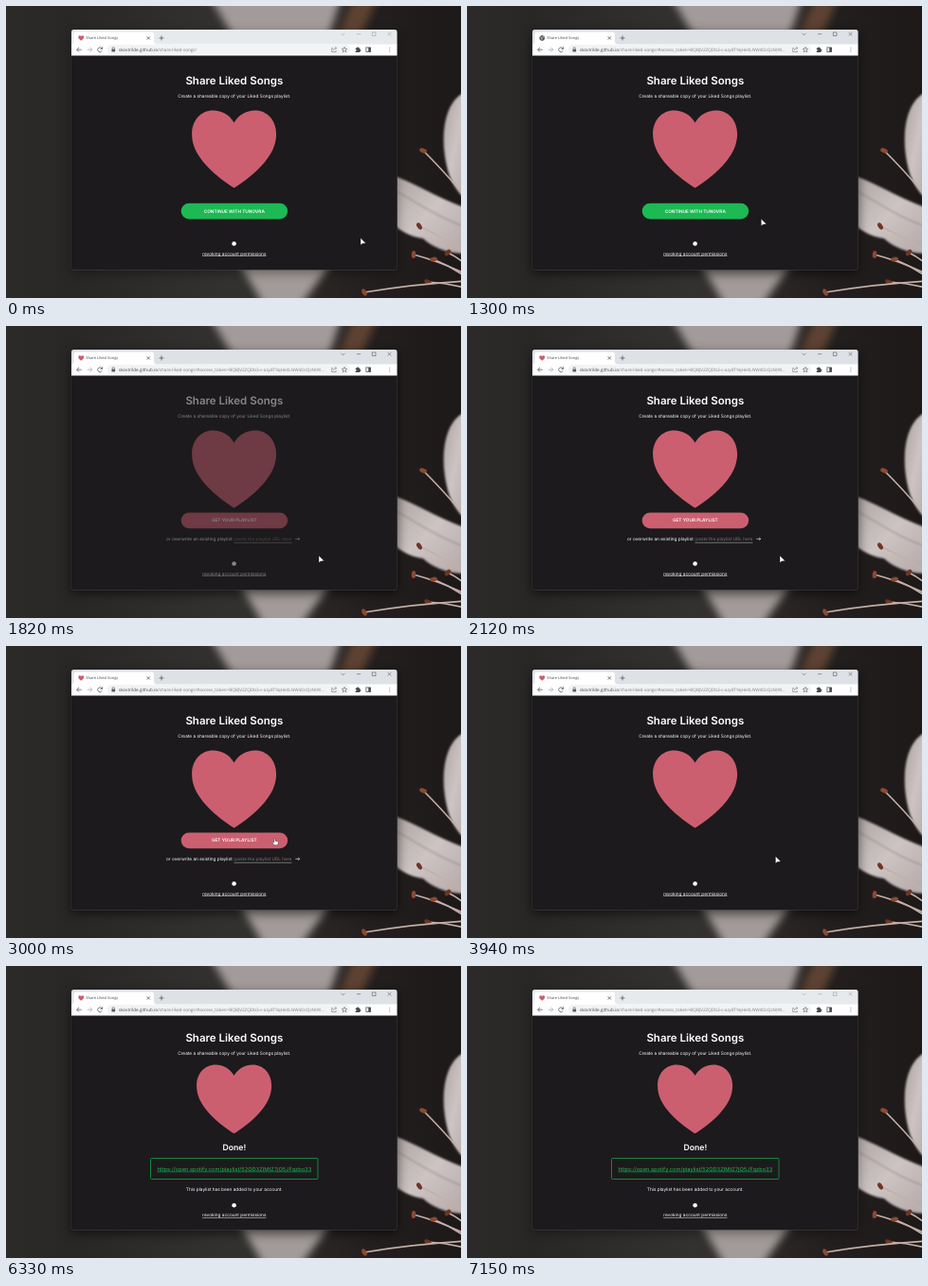
These frames come from a looping animation (480x309 px, 7.18 s). An HTML page:

```html
<!DOCTYPE html>
<html lang="en">
<head>
<meta charset="utf-8">
<title>Share Liked Songs</title>
<style>
  html, body { margin: 0; width: 100%; height: 100%; overflow: hidden; background: #222120; }
  svg { display: block; width: 100%; height: 100%; }
  text { text-rendering: geometricPrecision; }
  .page text { font-family: Inter, "Open Sans", sans-serif; font-size: 4.75px; fill: #fff; text-anchor: middle; }
  .page .title { font-size: 11.5px; font-weight: 600; }
  .page .label { font-size: 4.75px; font-weight: 600; }
  .page .done { font-size: 8.7px; font-weight: 600; }
  .page .link { font-size: 5.7px; fill: #1db954; }
  .page .left { text-anchor: start; }
  .underline { text-decoration: underline; }
  .chrome text { font-family: "Open Sans", "Noto Sans", sans-serif; fill: #45494d; }
  .chrome .path { fill: #7b8085; }
  .line { fill: none; stroke: #54585c; stroke-width: .8; }
</style>
</head>
<body>
<svg viewBox="0 0 480 309" xmlns="http://www.w3.org/2000/svg">
  <defs>
    <linearGradient id="night">
      <stop offset="0" stop-color="#2c2b29"/><stop offset=".14" stop-color="#282725"/>
      <stop offset=".5" stop-color="#343230"/><stop offset=".8" stop-color="#231f1e"/>
      <stop offset="1" stop-color="#1d1919"/>
    </linearGradient>
    <linearGradient id="petal" x1="0" y1="0" x2="1" y2="1">
      <stop offset="0" stop-color="#aaa19f"/><stop offset=".5" stop-color="#cdc4c3"/>
      <stop offset="1" stop-color="#b3a8a7"/>
    </linearGradient>
    <filter id="soft" x="-30%" y="-50%" width="160%" height="200%"><feGaussianBlur stdDeviation="4"/></filter>
    <filter id="haze" x="-30%" y="-30%" width="160%" height="160%"><feGaussianBlur stdDeviation="1"/></filter>
    <filter id="shade" x="-20%" y="-20%" width="140%" height="140%"><feGaussianBlur stdDeviation="6"/></filter>
    <clipPath id="frame"><rect x="69" y="25" width="343.5" height="254" rx="2.5"/></clipPath>
    <path id="heart" fill="#cb5f70" d="M0 82.5C-7 78-19 70-29 59C-39 48-44.5 37.500-44.5 25.5C-44.5 11-35 .5-22 .5C-13 .5-4.5 5.500 0 13.5C4.5 5.500 13 .5 22 .5C35 .5 44.5 11 44.5 25.5C44.5 37.500 39 48 29 59C19 70 7 78 0 82.5Z"/>
  </defs>

  <g id="photo">
    <rect width="480" height="309" fill="url(#night)"/>
    <g filter="url(#soft)">
      <path fill="#a29b99" d="M212 -15H356L338 40H244Z"/>
      <path fill="#5d4232" d="M368 -12H394L370 40H346Z"/>
      <path fill="#a29b99" d="M240 262H350L306 324H276Z"/>
    </g>
    <g filter="url(#haze)">
      <path fill="url(#petal)" d="M486 90C468 98 460 120 462 150C464 174 470 192 486 206Z"/>
      <path fill="url(#petal)" d="M404 178C430 186 456 204 486 214V262C466 262 451 256 440 246C425 244 412 236 404 226Z"/>
      <path fill="none" stroke="#8d807e" stroke-width="1" d="M480 232C458 224 436 210 412 196"/>
    </g>
    <g id="stamens" fill="none" stroke="#c4b0a8" stroke-width="1.6"></g>
  </g>

  <rect id="shadow" x="69" y="29" width="343.5" height="254" rx="3" filter="url(#shade)"/>
  <rect x="68.700" y="25" width="344.100" height="254.400" rx="2.8" fill="#4a4745"/>
  <g clip-path="url(#frame)">
    <rect x="69" y="52" width="344" height="228" fill="#1c1a1c"/>
    <g class="page" id="pages"></g>
    <g class="chrome">
      <rect id="strip" x="69" y="25" width="344" height="16"/>
      <path fill="#fff" d="M69 40.5C71 40.5 71.5 39 71.5 37V30Q71.5 27.5 74 27.5H153.5Q156 27.5 156 30V37C156 39 157 40.5 159 40.5H413V52.5H69Z"/>
      <use id="loved" href="#heart" transform="translate(79.2 31.2) scale(.066)"/>
      <g id="globe" class="line"><circle cx="79.2" cy="33.9" r="2.5" fill="#5f6368"/><path stroke="#fff" stroke-width=".6" d="M77.5 33L79 34L78.8 35.6M79.7 32L81 33.5"/></g>
      <text x="84.2" y="35.4" font-size="4.05">Share Liked Songs</text>
      <path class="line" d="M148.7 32.3L151.9 35.5M151.9 32.3L148.7 35.5M161.5 33.9H166.5M164 31.4V36.4"/>
      <path id="controls" fill="none" stroke-width=".55" d="M353.5 28.8L355.5 30.8L357.5 28.8M370 29.7H374.3M386.3 27.9H390V31.5H386.3ZM402.700 27.900L406.300 31.5M406.300 27.900L402.700 31.5"/>
      <rect x="106.5" y="41" width="256.5" height="10.2" rx="5.1" fill="#f1f3f4"/>
      <g class="line">
        <path d="M79.8 46.2H74.8M77 43.8L74.6 46.2L77 48.6"/>
        <path stroke="#a9adb1" d="M85.7 46.2H90.7M88.5 43.8L90.9 46.2L88.5 48.6"/>
        <path d="M101.2 45A2.4 2.4 0 1 0 101.3 47.3M101.6 43.3V45.4H99.5"/>
        <path stroke-width=".6" d="M112.2 45.7V44.7A1.1 1.1 0 0 1 114.4 44.7V45.7"/>
        <rect x="111.5" y="45.6" width="3.6" height="2.8" fill="#54585c" stroke="none"/>
        <path stroke-width=".5" d="M345 44.5H343.7V48.6H348.2V47M345.5 47C345.6 45.2 346.5 44.6 348.5 44.6M347.3 43.3L348.7 44.6L347.3 45.9"/>
        <path stroke-width=".6" d="M357 43.5L357.8 45.2L359.7 45.4L358.3 46.7L358.7 48.6L357 47.6L355.3 48.6L355.7 46.7L354.3 45.4L356.2 45.2Z"/>
        <path fill="#44484c" stroke="none" d="M368.7 44.5H370A1.1 1.1 0 0 1 372.2 44.5H373.3V45.8A1.1 1.1 0 0 1 373.3 48V49H368.7V47.7A1 1 0 0 0 368.7 45.7Z"/>
        <rect x="379.9" y="43.9" width="4.6" height="4.6"/><path fill="#44484c" stroke="none" d="M382.3 43.9H384.7V48.5H382.3Z"/>
        <path stroke-linecap="round" d="M404.8 44.2V44.21M404.8 46.2V46.21M404.8 48.2V48.21"/>
      </g>
      <text x="118.8" y="47.9" font-size="4.65">skovtrilde.github.io<tspan class="path" id="path"></tspan></text>
    </g>
  </g>

  <g id="cursor" stroke="#111" stroke-width=".4" fill="#fff">
    <path id="arrow" d="M0 0V7.6L1.9 6L5.6 5.6Z"/>
    <path id="hand" d="M-.7 .6Q0 -.3 .6 .6V2.7L3.3 3.3Q3.9 3.5 3.8 4.3L3.2 7.3H-.4L-2.6 4.6Q-2.5 3.5 -1.5 4L-.7 4.7Z"/>
  </g>
</svg>

<script>
const LOOP = 7180;
const CLICK = 880, REDIRECT = 1150, BLANK = 1520, FADE_IN = 1580;
const SUBMIT = 3180, DONE = 4420, EXIT = 5490, BLUR = 6330;
const CENTER = 240.8;
const $ = id => document.getElementById(id);
const clamp = v => Math.max(0, Math.min(1, v));
const swing = v => .5 - Math.cos(Math.PI * clamp(v)) / 2;
const mix = (a, b, k) => a + (b - a) * k;
const show = (id, on) => $(id).setAttribute('visibility', on ? 'visible' : 'hidden');
const fade = (id, value) => $(id).setAttribute('opacity', value);

const label = (y, str, cls = '', x = CENTER) => `<text class="${cls}" x="${x}" y="${y}">${str}</text>`;
const pill = (y, fill, str) =>
  `<rect x="184.7" y="${y}" width="112.5" height="16.7" rx="8.35" fill="${fill}"/>` + label(y + 9.9, str, 'label');

function page(id, { top = 0, heartY = 110, scale = 1, foot = 0 }, body) {
  return `<g id="${id}">
    ${label(83.4 + top, 'Share Liked Songs', 'title')}
    ${label(96.6 + top, 'Create a shareable copy of your Liked Songs playlist.')}
    <use href="#heart" transform="translate(${CENTER - .2} ${heartY}) scale(${scale})"/>
    ${body}
    <circle cx="${CENTER - .2}" cy="${251.5 + foot}" r="2.3" fill="#fff"/>
    ${label(263.5 + foot, 'revoking account permissions', 'underline')}
  </g>`;
}

$('pages').innerHTML =
  page('login', {}, pill(208.7, '#1db954', 'CONTINUE WITH TUNOVRA')) +
  page('ready', {}, `<g id="actions">
    ${pill(197.5, '#cb5f70', 'GET YOUR PLAYLIST')}
    ${label(226.8, 'or overwrite an existing playlist:', 'left', 169)}
    <g opacity=".4">${label(226.8, 'paste the playlist URL here', 'left', 241.3)}</g>
    <path d="M240.5 229.3H301.5" stroke="#aaa" stroke-width=".6"/>
    <path d="M305.3 225.3H309.7M308.2 223.9L309.7 225.3L308.2 226.7" fill="none" stroke="#fff" stroke-width=".6"/>
  </g>`) +
  page('result', { top: -3, heartY: 104, scale: .888, foot: 1.8 }, `
    ${label(195.2, 'Done!', 'done')}
    <rect x="152.5" y="203.5" width="176.5" height="22" rx="1" fill="none" stroke="#1a8f43" stroke-width=".9"/>
    ${label(216.6, 'https://open.spotify.com/playlist/52OD3ZIMtZ7jO5JFqzbo33', 'link underline')}
    ${label(238.2, 'This playlist has been added to your account.')}`);

// Each stamen: anther x, y, then where its filament leaves the stage.
const stamens = [
  [440, 153, 486, 204], [436, 233, 486, 262], [430, 263, 486, 284],
  [466, 261, 490, 278], [451, 268, 490, 290], [445, 292, 490, 300], [378, 303, 486, 291]
];
$('stamens').innerHTML = stamens.map(([x, y, endX, endY], i) =>
  `<path d="M${x} ${y}Q${(x + endX) / 2} ${(y + endY) / 2 - 3} ${endX} ${endY}"/>
   <ellipse cx="${x}" cy="${y}" rx="4" ry="2.3" transform="rotate(${20 + i * 37} ${x} ${y})" fill="${i % 2 ? '#6e3524' : '#8a4a30'}" stroke="none"/>`).join('');

// Pointer stops: time, x, y and how far the way there bows upwards.
const path = [
  [120, 374, 245.5], [820, 284, 213], [990, 284, 213], [1560, 330, 243, 5],
  [2130, 330, 243], [2900, 283.5, 203.5], [3420, 283.5, 203.5],
  [4090, 331, 225], [5090, 331, 225], [EXIT, 358.5, 299]
];

function cursorAt(t) {
  const next = path.findIndex(p => p[0] > t);
  if (next === 0) return path[0].slice(1);
  if (next < 0) return path[path.length - 1].slice(1);
  const [t0, x0, y0] = path[next - 1], [t1, x1, y1, bow = 0] = path[next];
  const k = swing((t - t0) / (t1 - t0));
  return [mix(x0, x1, k), mix(y0, y1, k) - bow * Math.sin(Math.PI * k)];
}

function render(t) {
  const focus = t < CLICK ? 0 : 1 - clamp((t - BLUR) / 90);
  const grey = (a, b) => `rgb(${a.map((v, i) => Math.round(mix(v, b[i], focus)))})`;
  $('strip').setAttribute('fill', grey([231, 234, 237], [222, 225, 230]));
  $('controls').setAttribute('stroke', grey([150, 153, 156], [75, 78, 82]));
  fade('shadow', mix(.35, .6, focus));

  const token = t < REDIRECT ? '' : '#access_token=BQBJV2ZQDb3-c-azy8T9qHeXLNW4DcQzNtW…';
  $('path').textContent = '/share-liked-songs/' + token;
  const loading = t >= REDIRECT && t < BLANK;
  show('globe', loading);
  show('loved', !loading);

  const done = clamp((t - DONE) / 100);
  show('login', t < BLANK);
  fade('ready', swing((t - FADE_IN) / 500) * (1 - done));
  fade('actions', t < SUBMIT ? 1 : 0);
  fade('result', done);

  const [x, y] = cursorAt(t);
  const onLogin = t < BLANK && x < 297 && y > 208 && y < 226;
  const onReady = t > FADE_IN && t < SUBMIT + 60 && x < 297 && y < 214.5;
  const hand = onLogin || onReady;
  $('cursor').setAttribute('transform', `translate(${x} ${y})`);
  show('arrow', !hand && t < EXIT);
  show('hand', hand);
}

function tick() {
  render(performance.now() % LOOP);
  requestAnimationFrame(tick);
}
tick();
</script>
</body>
</html>
```
